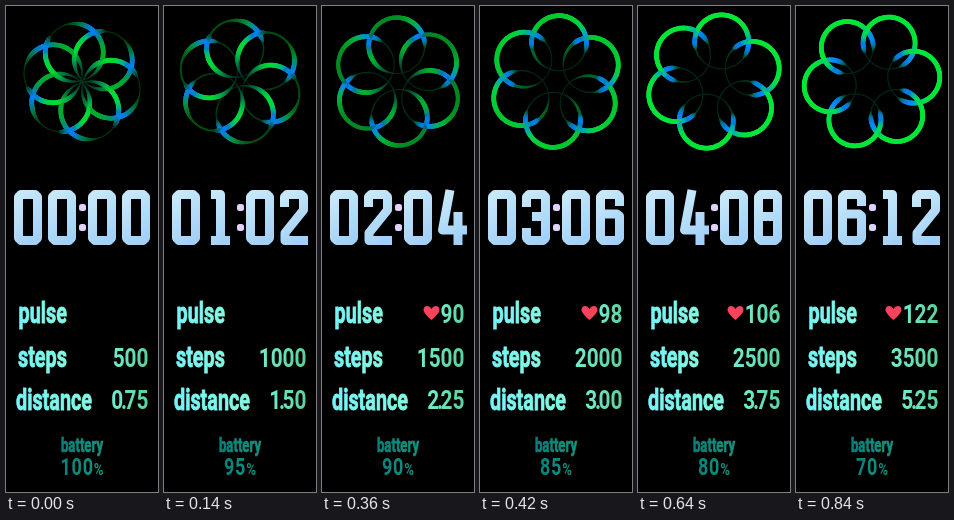
Recreate the animation shown at these times as an HTML page. Size 152 px wide and 486 px high, loop 980 ms.

```html
<!DOCTYPE html>
<html lang="en">
<head>
<meta charset="utf-8">
<title>Fitness band</title>
<style>
  html, body { margin: 0; width: 100%; height: 100%; overflow: hidden; background: #000; }
  svg { display: block; width: 152px; height: 486px; }
  text { font-family: Roboto, "Liberation Sans", sans-serif; font-weight: 700; }
  .label { font-size: 30px; fill: url(#mint); stroke: url(#mint); stroke-width: .9px; }
  .value { font-size: 26.7px; fill: url(#sea); text-anchor: end; }
  .battery { font-size: 20px; fill: url(#teal); stroke: url(#teal); stroke-width: .7px; text-anchor: middle; }
  .level { font-size: 23px; fill: url(#teal); text-anchor: middle; letter-spacing: 1px; }
  .level .unit { font-size: 17px; letter-spacing: 0; }
  #clock path { fill: none; stroke: url(#ice); stroke-width: 9; stroke-linejoin: round; }
  #flower path { fill: none; stroke-linecap: round; }
</style>
</head>
<body>
<svg viewBox="0 0 152 486">
  <defs>
    <linearGradient id="mint"><stop stop-color="#74f4f8"/><stop offset="1" stop-color="#84f8e0"/></linearGradient>
    <linearGradient id="sea"><stop stop-color="#72ecd0"/><stop offset="1" stop-color="#5ad09c"/></linearGradient>
    <linearGradient id="teal"><stop stop-color="#08807a"/><stop offset="1" stop-color="#159480"/></linearGradient>
    <linearGradient id="ice" gradientUnits="userSpaceOnUse" x1="0" y1="10" x2="28" y2="45">
      <stop stop-color="#c6e8fa"/><stop offset="1" stop-color="#a2d0f6"/>
    </linearGradient>
  </defs>
  <rect width="152" height="486"/>
  <g id="flower" transform="translate(76 75.5)"></g>
  <g id="clock"></g>
  <g fill="#e2d2fb">
    <rect x="73" y="198" width="7" height="7" rx="2.5"/>
    <rect x="73" y="218" width="7" height="7" rx="2.5"/>
  </g>

  <text class="label" transform="translate(12.5 317) scale(.66 1)">pulse</text>
  <text class="label" transform="translate(12 361) scale(.66 1)">steps</text>
  <text class="label" transform="translate(10 404) scale(.66 1)">distance</text>

  <path id="heart" fill="#f8435c" d="M0 7C-4 4-8-1-8-3C-8-8-2-8 0-4C2-8 8-8 8-3C8-1 4 4 0 7Z"/>
  <text class="value" id="pulse" transform="translate(142.5 317) scale(.78 1)"></text>
  <text class="value" id="steps" transform="translate(142.5 361) scale(.78 1)"></text>
  <text class="value" id="distance" dx="0 -3 -3" transform="translate(142.5 403) scale(.78 1)"></text>

  <text class="battery" transform="translate(76 446) scale(.66 1)">battery</text>
  <text class="level" transform="translate(76 469) scale(.78 1)"><tspan id="level"></tspan><tspan class="unit">%</tspan></text>
</svg>
<script>
const STEP = 140, STEPS = 7, PETALS = 6, PIECES = 96;
const byId = id => document.getElementById(id);

// Centre lines of the clock numerals in a 28 by 55 box.
const FRAME = 'M7 4.5H21L23.5 7V48L21 50.5H7L4.5 48V7Z';
const NUMERALS = {
  0: FRAME,
  1: 'M5 4.5H14.5V50.5M5 50.5H24',
  2: 'M4.5 17V7L7 4.5H21L23.5 7V20L5 43V50.5H28',
  3: 'M4.5 17V7L7 4.5H21L23.5 7V48L21 50.5H7L4.5 48V38M23.5 26.5H10',
  4: 'M12 0L4.5 40H29M20 22V55',
  5: 'M26 4.5H4.5V23.5H21L23.5 26V48L21 50.5H7L4.5 48V38',
  6: 'M23.5 16V7L21 4.5H7L4.5 7V48L7 50.5H21L23.5 48V26L21 24H4.5',
  8: FRAME + 'M4.5 26.5H23.5'
};

function addPath(parent, attributes = {}) {
  const path = document.createElementNS('http://www.w3.org/2000/svg', 'path');
  for (const name in attributes) path.setAttribute(name, attributes[name]);
  return parent.appendChild(path);
}

const digits = [8, 42, 82, 116].map(x => addPath(byId('clock'), { transform: `translate(${x} 184)` }));
// Ordered from the inner end of each ring to the outer one, so the rim lies on top.
const pieces = Array.from({ length: PIECES }, (_, i) => {
  const side = i % 2 ? 1 : -1;
  const turn = side * (1 - (Math.floor(i / 2) + 0.5) / (PIECES / 2));
  return { turn, path: addPath(byId('flower')) };
});

const mix = (a, b, t) => a + (b - a) * t;
const bump = (x, centre, width) => Math.exp(-(((x - centre) / width) ** 2));
const smooth = (a, b, x) => {
  const t = Math.min(1, Math.max(0, (x - a) / (b - a)));
  return t * t * (3 - 2 * t);
};

// Light along a ring: turn 0 is the rim, +1 and -1 meet nearest the centre.
// The rim starts bright at its clockwise end and fades towards the other one.
function shade(turn, step) {
  const p = step / (STEPS - 1);
  const away = Math.abs(turn);
  const bend = mix(0.34, 0.64, p);
  const fade = smooth(0, 0.6, (turn + bend) / (2 * bend));
  const rim = mix(1, mix(0.2, 1, smooth(0, 4, step)), fade);
  const trailing = mix(0.95, 0.3, smooth(1, 4, step));
  const leading = mix(0.75, 0.22, smooth(0, 1.2, step));
  const arm = (turn > 0 ? trailing : leading) * mix(1, 0.25, smooth(0.6, 1, away));
  const blue = turn < 0 ? bump(turn, 0.06 - bend, 0.14) : bump(turn, bend, 0.1);
  const base = mix(rim, arm, smooth(bend - 0.08, bend + 0.08, away));
  const light = Math.max(base, 0.95 * blue, 0.18);
  const cool = Math.max(blue, 0.3 * smooth(0.4, 0.15, 1 - away));
  const rgb = [0, mix(230, 135, cool), mix(55, 255, cool)].map(c => Math.round(c * light));
  return { color: `rgb(${rgb})`, width: mix(1, 4.8, smooth(0.1, 0.8, light)) };
}

function drawFlower(step) {
  const p = step / (STEPS - 1);
  const reach = 30 + 12 * Math.sin(p * Math.PI / 2);
  const radius = 29 - 3 * p;
  const tilt = step * 6.5 - 105;
  const half = 1 / PIECES;

  for (const { turn, path } of pieces) {
    let d = '';
    for (let n = 0; n < PETALS; n++) {
      const axis = (tilt + n * 360 / PETALS) * Math.PI / 180;
      const point = t => {
        const a = axis - t * Math.PI;
        const x = reach * Math.cos(axis) + radius * Math.cos(a);
        const y = reach * Math.sin(axis) + radius * Math.sin(a);
        return `${x.toFixed(2)} ${y.toFixed(2)}`;
      };
      d += `M${point(turn - half)}A${radius} ${radius} 0 0 0 ${point(turn + half)}`;
    }
    const { color, width } = shade(turn, step);
    path.setAttribute('d', d);
    path.setAttribute('stroke', color);
    path.setAttribute('stroke-width', width.toFixed(2));
  }
}

function drawReadings(step) {
  const pad = n => String(n).padStart(2, '0');
  const time = pad(step) + pad(step * 2);
  digits.forEach((path, i) => path.setAttribute('d', NUMERALS[time[i]]));

  const beating = step >= 2;
  const pulse = beating ? String(74 + step * 8) : '';
  byId('pulse').textContent = pulse;
  byId('heart').setAttribute('visibility', beating ? 'visible' : 'hidden');
  byId('heart').setAttribute('transform', `translate(${133.5 - 12 * pulse.length} 307)`);
  byId('steps').textContent = 500 * (step + 1);
  byId('distance').textContent = (0.75 * (step + 1)).toFixed(2);
  byId('level').textContent = 100 - 5 * step;
}

let shown = -1;
function render(ms) {
  const step = Math.floor(ms / STEP) % STEPS;
  if (step === shown) return;
  shown = step;
  drawFlower(step);
  drawReadings(step);
}

const start = performance.now();
function tick() {
  render(performance.now() - start);
  requestAnimationFrame(tick);
}
tick();
</script>
</body>
</html>
```
